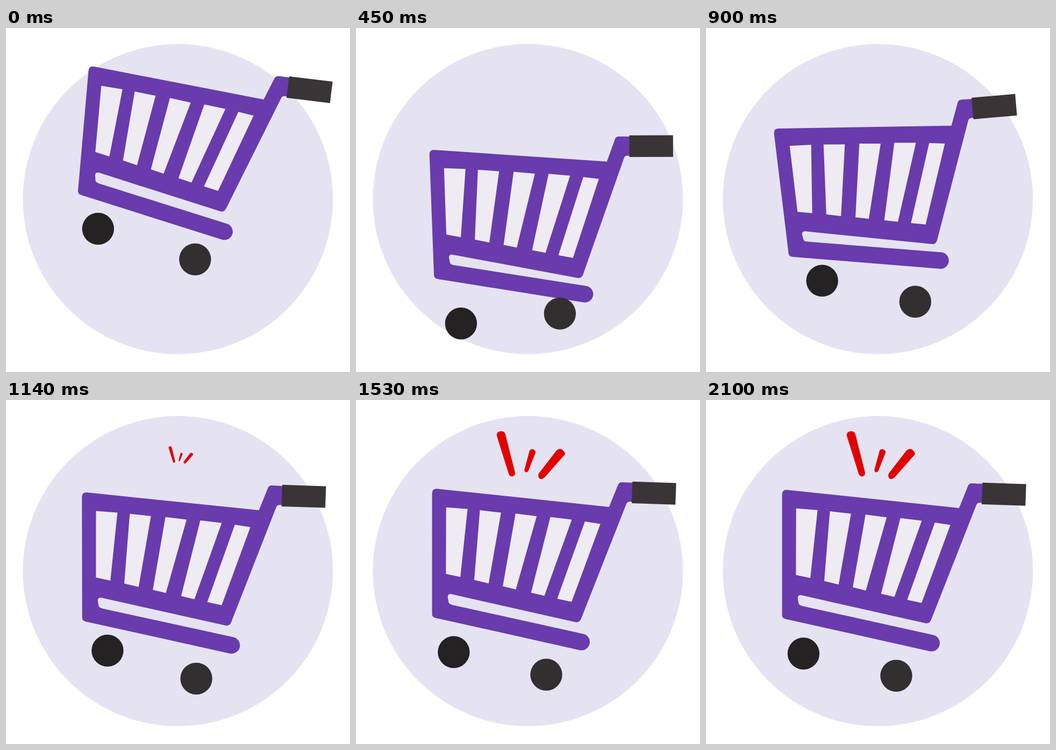
An HTML page without scripts that plays this animation: 640x640 px, repeating every 2.13 s.

```html
<!DOCTYPE html>
<html lang="en">
<head>
<meta charset="utf-8">
<title>Shopping cart</title>
<style>
  html, body { margin: 0; width: 100%; height: 100%; overflow: hidden; background: #fff; }
  svg { display: block; width: 100vw; height: 100vh; }

  .cart, .bar, .sparks, .wheel {
    animation-duration: 2130ms;
    animation-iteration-count: infinite;
    animation-timing-function: cubic-bezier(.37, 0, .63, 1);
  }
  .cart { fill: #693bac; transform-origin: 276px 362px; animation-name: drop, tilt; }
  .bar { transform-origin: 160px 452px; animation-name: flex; }
  .sparks { fill: #e20000; transform-origin: 325.5px 102px; animation-name: pop; }
  .back { fill: #242223; animation-name: back-x, back-y; }
  .front { fill: #312f30; animation-name: front-x, front-y; }
  .gaps { fill: #eeebf2; }

  @keyframes drop {
    0% { translate: 0 -139.5px; animation-timing-function: cubic-bezier(.45, 0, .6, 1); }
    23.47% { translate: 0 3.5px; }
    33.8% { translate: 0 -52px; }
    50.7% { translate: 0 -49.5px; }
    71.83% { translate: 0 -56.3px; }
    98.59%, 100% { translate: 0 -54.3px; }
  }
  @keyframes tilt {
    0%, 14.08% { rotate: 7deg; }
    28.17%, 36.15% { rotate: -7.1deg; }
    54.93%, 100% { rotate: 2deg; }
  }
  @keyframes flex {
    0%, 14.08% { rotate: 1.4deg; }
    21.13%, 36.15% { rotate: 0deg; }
    53.99%, 100% { rotate: 1.4deg; }
  }
  @keyframes pop {
    0%, 48.26% { scale: 0; }
    62.7% { scale: 1.22; }
    69.95%, 100% { scale: 1; }
  }
  @keyframes back-x {
    0% { cx: 171.3px; }
    14.3% { cx: 170.5px; }
    28.4%, 36.15% { cx: 222.3px; }
    60.09% { cx: 182px; }
    98.59%, 100% { cx: 181.4px; }
  }
  @keyframes back-y {
    0% { cy: 373.5px; animation-timing-function: cubic-bezier(.4, 0, .8, .8); }
    12.68% { cy: 465px; animation-timing-function: cubic-bezier(.2, .2, .6, 1); }
    21.13% { cy: 549.7px; }
    30.99% { cy: 474.2px; }
    53.52% { cy: 466.2px; }
    71.83% { cy: 469px; }
    98.59%, 100% { cy: 471.8px; }
  }
  @keyframes front-x {
    0% { cx: 351.8px; }
    13.6% { cx: 350.7px; }
    27.7%, 36.15% { cx: 402px; }
    53.99%, 100% { cx: 354px; }
  }
  @keyframes front-y {
    0% { cy: 430.5px; }
    15.49% { cy: 554px; animation-timing-function: cubic-bezier(.3, .08, .62, 1); }
    30.99% { cy: 494px; }
    50.7% { cy: 518.7px; }
    71.83% { cy: 511px; }
    98.59%, 100% { cy: 513px; }
  }
</style>
</head>
<body>
<svg viewBox="0 0 640 640">
  <circle cx="319.8" cy="318.3" r="288.5" fill="#e5e3f2"/>

  <g class="sparks">
    <path d="M262 67Q261 60 267 58.5Q275.5 56 278 64L295.7 134Q297 141 291 142.3Q286 143 284 137Z"/>
    <path d="M323 94Q324 91 328 91.5Q335 92.5 334 98L321 131Q319 135 316 134.5Q312.5 133 313.5 129Z"/>
    <path d="M373 94Q378 89 383 92Q390 97 388.5 101.5L351 144Q346 149 341 146Q337.5 141 340.5 136Z"/>
  </g>

  <g class="cart">
    <path class="bar" d="M170 438.5L428.4 479.7A15.5 15.5 0 0 1 423.5 510.3L152 466.3Z"/>
    <path d="M137 235Q136.8 225.3 146 226L467 248.5L482.5 206Q484.5 201.7 490 201.8L512 202V237.5H505Q500 237.5 498.5 243L422 459Q419 466 412 464.8L180 421Q172 420 173 427L174.5 435Q175.5 440 181 440.3L178 469.7L151 466Q145 465 144.8 459Z"/>
    <g class="gaps">
      <path d="M164 260L204 261.5L195 388.5L168 383.5Z"/>
      <path d="M227 263L266.5 266L248 398.5L221 393Z"/>
      <path d="M293.5 267L333 270.5L299 408L274.5 403Z"/>
      <path d="M358.5 271L398.5 274.5L352.5 418L327.5 413Z"/>
      <path d="M423 277L452 280.5L403.5 427.5L376.5 422.5Z"/>
    </g>
    <rect x="508.8" y="199.8" width="81.4" height="40.2" fill="#393435"/>
  </g>

  <circle class="wheel back" r="29.7"/>
  <circle class="wheel front" r="29.7"/>
</svg>
</body>
</html>
```
